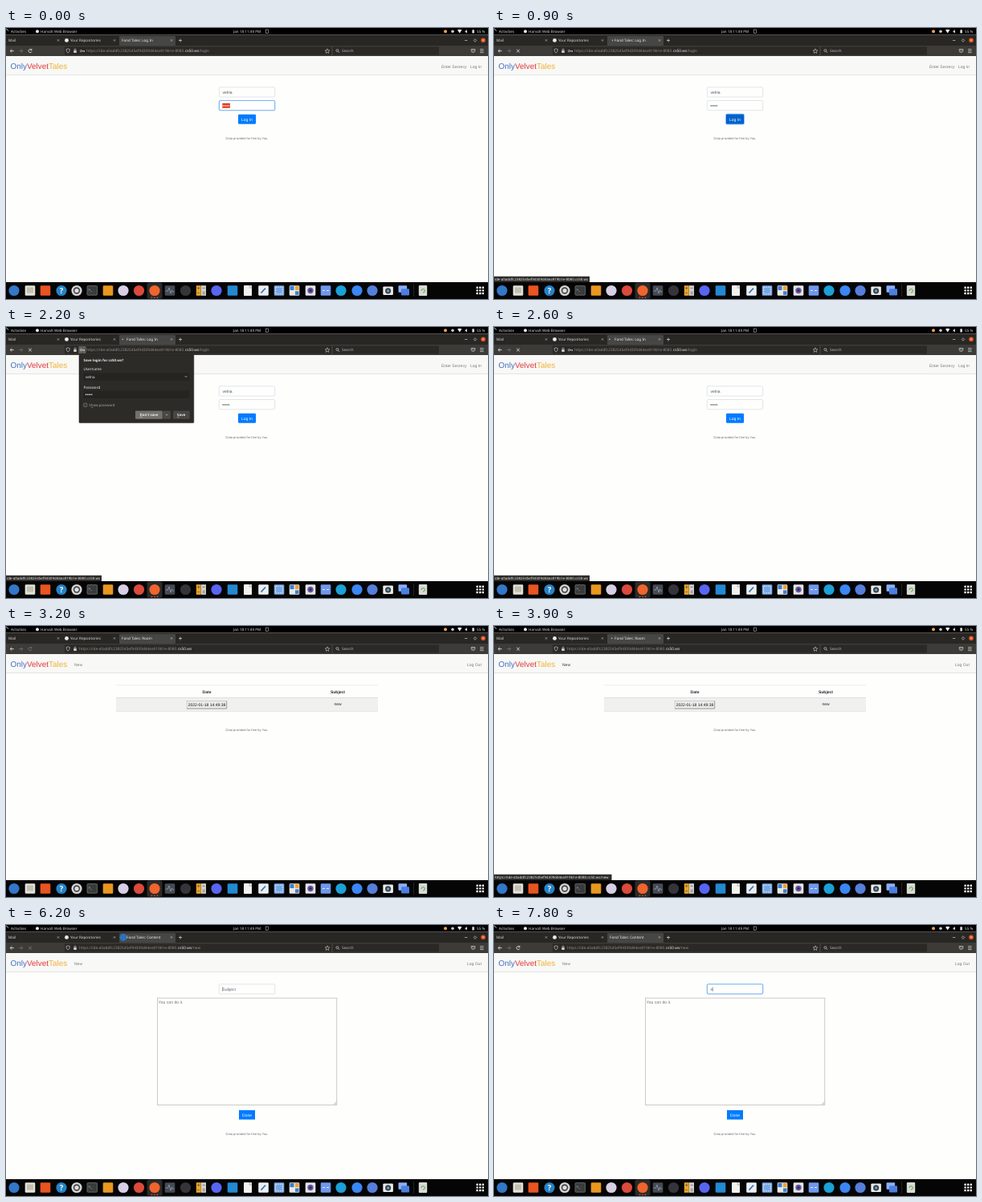
Write an HTML page that moves like this. It is 600 px wide and 338 px high and loops after 8000 ms.

```html
<!DOCTYPE html>
<html lang="en">
<head>
<meta charset="utf-8">
<title>Diary login</title>
<style>
html, body { margin: 0; width: 100%; height: 100%; overflow: hidden; background: #fefefe; }
svg { display: block; width: 100vw; height: 100vh; text-rendering: geometricPrecision; white-space: pre; }
.ui { font-family: "Noto Sans", sans-serif; font-size: 4.6px; }
.page { font-family: "Liberation Sans", Arial, sans-serif; font-size: 5px; }
</style>
</head>
<body>
<svg id="stage" viewBox="0 0 600 338"></svg>
<script>
const LOOP = 8000, LOADED = 2800, CLICK = 3800, EDIT = 6100;
const HOST = 'ide-a0addfc2382545ef94309d44ea919b1e-8080.';
const USER = 'velna';

const rect = (x, y, w, h, fill, more = '') =>
  `<rect x="${x}" y="${y}" width="${w}" height="${h}" fill="${fill}" ${more}/>`;
const dot = (x, y, r, fill, more = '') => `<circle cx="${x}" cy="${y}" r="${r}" fill="${fill}" ${more}/>`;
const line = (d, color = '#ddd', w = .7, more = '') =>
  `<path d="${d}" fill="none" stroke="${color}" stroke-width="${w}" ${more}/>`;
const text = (x, y, s, fill, more = '') => `<text x="${x}" y="${y}" fill="${fill}" ${more}>${s}</text>`;
const mid = 'text-anchor="middle" ', bold = 'font-weight="700" ';
const size = n => `style="font-size:${n}px"`;
// content visible only during "from-to" spans, in ms
const during = (spans, ...parts) => `<g data-spans="${spans}">${parts.join('')}</g>`;
const cross = (x, y, r = 1.2, color, w) =>
  line(`M${x - r} ${y - r}l${2 * r} ${2 * r}m0 ${-2 * r}l${-2 * r} ${2 * r}`, color, w);
const chevron = (x, y) => line(`M${x - 1.3} ${y - .6}l1.3 1.3 1.3-1.3`);
const bullets = (x, y, color) => [0, 1, 2, 3, 4].map(i => dot(x + 1 + i * 1.85, y, .75, color)).join('');

function topBar() {
  return rect(0, 0, 600, 8.5, '#000') + line('M0 .5l3 3.2', '#eee', .9) +
    text(6, 6, 'Activities', '#ddd') +
    dot(39, 4.3, 2, '#e8e8e8') + text(43, 6, 'Harvolt Web Browser', '#ddd') +
    text(283, 6, 'Jan 18  11:49 PM', '#ddd') + rect(323.5, 2, 3, 4.4, 'none', 'stroke="#bbb" stroke-width=".6"') +
    dot(547, 4.2, 2, '#f0a050') + dot(556, 4.2, 1.8, '#ccc') +
    '<path d="M562 2.6q2.7-1.6 5.4 0l-2.7 3.8z" fill="#eee"/>' +
    '<path d="M571.5 3.4h1l1.4-1.3v4.4l-1.4-1.3h-1z" fill="#ddd"/>' +
    rect(580.3, 2.2, 2.6, 4.4, '#ddd', 'rx=".5"') + text(586, 6, '55 %', '#ddd');
}

function tabs() {
  const title = (from, to, x, name) => during(`${from}-${to}`, text(x, 17.2, 'Fond Tales: ' + name, '#f2f2f2'));
  return rect(0, 8.5, 600, 14, '#282724') + rect(141, 10, 70, 12, '#464745', 'rx="1"') +
    text(3, 17.2, 'Mail', '#ddd') + dot(75.5, 15.4, 2.4, '#eee') + text(80, 17.2, 'Your Repositories', '#ddd') +
    [65, 135, 206].map(x => cross(x, 15.4, 1.1, '#ccc', .6)).join('') +
    line('M215 15.5h4m-2-2v4') +
    line('M571 15.5h3.4', '#ccc') + line('M584 13.7l1.8 1.8-1.8 1.8-1.8-1.8z', '#ccc') +
    dot(594, 15.2, 2.8, '#e95420') + cross(594, 15.2, .9, '#fff', .5) +
    title(0, 700, 144, 'Log In') + title(700, LOADED, 150, 'Log In') +
    title(LOADED, 3100, 150, 'Room') + title(3100, CLICK, 144, 'Room') + title(CLICK, EDIT, 150, 'Room') +
    dot(146, 15.4, 4, '#2c74c4', 'id="burst"') +
    title(EDIT, 6600, 150, 'Content') + title(6600, LOOP, 144, 'Content') +
    dot(145, 15.4, .8, '#bbb', 'id="spinner"');
}

function toolbar() {
  const stop = c => cross(30, 28.6, 1.8, c, .8);
  const reload = c => line('M31.9 27.4a2.1 2.1 0 1 0 .2 1.9m-.1-3.4v1.7h-1.8', c, .8);
  const url = (x, path) => text(x, 30.3, 'https://' + HOST, '#92918d', size(4.74)) +
    text(x + 123, 30.3, `cs50.ws<tspan fill="#92918d">${path}</tspan>`, '#f2f2f2', size(4.74));
  return rect(0, 22, 600, 13, '#3c3b37') +
    line('M9.8 28.6h-4.6m2.1-2.1l-2.1 2.1 2.1 2.1', '#eee', .8) +
    line('M16.2 28.6h4.6m-2.1-2.1l2.1 2.1-2.1 2.1', '#777', .8) +
    during('0-700,3500-3800,6900-8000', reload('#eee')) +
    during('2800-3500,6300-6900', reload('#77756f')) +
    during('700-2800,3800-6100', stop('#eee')) + during('6100-6300', stop('#85837e')) +
    rect(73, 23.4, 332, 10.2, '#2a2926', 'rx="1.2"') + rect(407, 23.4, 132, 10.2, '#2a2926', 'rx="1.2"') +
    line('M75 26.6l2.2-.8 2.2.8q0 3.2-2.2 4.6q-2.2-1.4-2.2-4.6z', '#ccc') +
    rect(84.2, 28, 3.6, 3, '#ccc', 'rx=".4"') + line('M85 28v-1a1 1 0 0 1 2 0v1', '#ccc') +
    during('1000-2500', rect(90.3, 24, 9.2, 9, '#62605b', 'rx="1"')) +
    during('0-2800', line('M94.5 28.6h3v1.4m-1.4-1.4v1', '#ddd') +
      dot(93.4, 28.6, 1.1, 'none', 'stroke="#ddd" stroke-width=".7"'), url(100, '/login')) +
    during('2800-6100', url(91, '')) + during('6100-8000', url(91, '/new')) +
    line('M400 25.8l.8 2 2.1.1-1.6 1.4.5 2.1-1.8-1.1-1.8 1.1.5-2.1-1.6-1.4 2.1-.1z', '#ccc', .6) +
    dot(412.4, 28.1, 1.5, 'none', 'stroke="#ccc" stroke-width=".7"') + line('M413.5 29.2l1.6 1.6') +
    text(418, 30.3, 'Search', '#bbb') +
    line('M579.2 26.5h4.6v1.6a2.3 2.3 0 0 1-4.6 0zm1.2 1.1l1.1 1.1 1.1-1.1') +
    line('M590 26.6h4.6m-4.6 2h4.6m-4.6 2h4.6');
}

function header() {
  const nav = (x, s, fill = '#787878') => text(x, 50, s, fill);
  return rect(0, 35, 600, 23.5, '#f8f8f7') + rect(0, 58, 600, .7, '#dcdcdc') +
    text(5.5, 50.6, '<tspan fill="#4070c0">Only</tspan><tspan fill="#df3a3a">Velvet</tspan><tspan fill="#f0b234">Tales</tspan>', '', size(9.95)) +
    during('0-2800', nav(542, 'Enter Secrecy'), nav(578, 'Log In')) +
    during('2800-8000', nav(574, 'Log Out')) +
    during('2800-3600,6100-8000', nav(85, 'New')) + during('3600-6100', nav(85, 'New', '#333'));
}

const input = y => rect(265.3, y, 69.4, 12.2, '#fefefd', 'rx="1.3" stroke="#ced4da" stroke-width=".6"');
const ring = (x, y, w, h, more = '') =>
  rect(x, y, w, h, 'none', `rx="1.5" stroke="#76b5f8" stroke-width="1.1" ${more}`);
const button = (x, y, w, h, fill, s, r) =>
  rect(x, y, w, h, fill, `rx="${r}"`) + text(x + w / 2, y + h / 2 + 1.8, s, '#fff', mid);
const footer = y => text(300, y, 'Data provided for free by You.', '#6c757d', mid + size(4));

function loginPage() {
  return input(73.8) + text(269.5, 81.7, USER, '#495057') + input(90.5) +
    during('0-700', ring(265.3, 90.5, 69.4, 12.2), rect(269.3, 93.8, 9.6, 6, '#e23c20'), bullets(269, 97, '#fff')) +
    during('700-2800', bullets(269, 97, '#495057')) +
    during('0-700,1700-2800', button(289, 107.7, 22, 12, '#007bff', 'Log In', 1.3)) +
    during('700-1700', ring(288.7, 107.4, 22.6, 12.6), button(289, 107.7, 22, 12, '#0062cc', 'Log In', 1.3)) +
    footer(139);
}

function roomPage() {
  return rect(137, 73.6, 326, .6, '#dee2e6') + rect(137, 90, 326, 16.4, '#f0f0ef') +
    rect(137, 89, 326, 1, '#dcdfe2') + rect(137, 106, 326, .6, '#dcdcdc') +
    text(250, 83.6, 'Date', '#212529', mid + bold) + text(413, 83.6, 'Subject', '#212529', mid + bold) +
    rect(225.2, 93.6, 49.4, 9.4, '#ececec', 'stroke="#bbb" stroke-width=".6"') + line('M225 103h49.7v-9.5', '#888') +
    text(250, 100.2, '2022-01-18 14:49:38', '#111', mid) + text(413, 99.2, 'new', '#212529', mid) + footer(131);
}

function editPage() {
  const caret = x => rect(x, 77.2, .4, 5.6, '#444');
  return input(73.8) + ring(265.3, 73.8, 69.4, 12.2, 'id="focus"') +
    during('6100-7800', text(269.3, 81.7, 'Subject', '#5c646b')) +
    during('6100-6800,7400-7800', caret(269)) +
    during('7800-8000', text(269.5, 81.7, 'n', '#495057') + caret(272.6)) +
    rect(188.4, 91.1, 223.4, 133.3, '#fefefd', 'stroke="#b4b4b4" stroke-width=".7"') +
    line('M408 223.8l3.2-3.2m-1.5 3.2l1.5-1.5', '#777', .5) +
    text(189.8, 98, 'You can do it.', '#707070', size(5.1)) +
    button(290, 231, 20, 11.6, '#007bff', 'Done', 0) + footer(262.4);
}

function saveDialog() {
  const label = (x, y, s, more) => text(x, y, s, '#eee', more);
  const choice = fill => rect(161, 104.4, 33.8, 10.4, fill, 'rx="1"');
  const field = y => rect(96.3, y, 132, 9.6, '#252421', 'rx="1"');
  return rect(91, 34.6, 142.8, 85, '#2c2b28', 'rx="1.2" stroke="#1b1a18" stroke-width=".5"') +
    '<path d="M92.5 34.8l2.6-2.6 2.6 2.6z" fill="#2c2b28"/>' +
    label(96.5, 43, 'Save login for cs50.ws?', bold + size(4.4)) +
    label(96.5, 54, 'Username') + field(57.2) + label(99, 63.5, USER) + chevron(224, 61.8) +
    label(96.5, 76.6, 'Password') + field(79.3) + bullets(98.4, 84.2, '#eee') +
    rect(96.7, 95.2, 4.2, 4.2, '#3b3a37', 'rx=".6" stroke="#999" stroke-width=".5"') +
    text(103.3, 99, 'S<tspan text-decoration="underline">h</tspan>ow password', '#aaa', size(4.4)) +
    during('1000-1800', choice('#484744')) + during('1800-2500', choice('#73716d')) +
    rect(195.2, 104.4, 9.8, 10.4, '#484744', 'rx="1"') + chevron(200, 109.5) +
    rect(208, 104.4, 20.6, 10.4, '#484744', 'rx="1"') +
    label(178, 111.2, '<tspan text-decoration="underline">D</tspan>on\'t save', mid + bold + size(4.4)) +
    label(218.2, 111.2, '<tspan text-decoration="underline">S</tspan>ave', mid + bold + size(4.4));
}

const status = (s, w) => rect(0, 309.8, w, 7.2, '#2c2b28') + text(1, 315.2, s, '#eee', size(4.45));

function dock() {
  const y = 327.5;
  const disc = (x, fill) => dot(x, y, 6.6, fill);
  const tile = (x, fill) => rect(x - 6.3, y - 6.3, 12.6, 12.6, fill, 'rx="1.3"');
  const sheet = x => rect(x - 5, y - 6.5, 10, 13, '#f1f1ef', 'rx=".8"');
  return rect(0, 317, 600, 21, '#050505') + rect(175.5, 317.5, 19, 20, '#2a2a2a', 'rx="2"') +
    disc(10, '#3277c8') +
    tile(30, '#e4e1d8') + rect(26, 323.5, 8, 7, '#c3bfb3') +
    tile(49, '#e95420') +
    disc(69, '#2583c7') + text(69, 331, '?', '#fff', mid + bold + size(9.5)) +
    disc(88, '#d5d5d5') + dot(88, y, 4.2, '#444') + dot(88, y, 2.6, '#ddd') +
    rect(101, 321.6, 12.6, 11.6, '#393c3d', 'rx="1" stroke="#888" stroke-width=".6"') + text(102.5, 328, '&gt;_', '#eee', size(4.5)) +
    tile(127, '#e8981f') + disc(146, '#d6cfe6') + disc(165.5, '#db4a3c') + disc(185, '#f0642d') +
    tile(204, '#454a55') + line('M198.5 328h3l1.5-4 2 7 1.5-4 1 2h2', '#aab9c6', .6) +
    disc(223.5, '#35343a') +
    rect(236.8, 321.2, 6, 12.6, '#eba52b') + rect(243, 321.2, 6, 12.6, '#d0d0cc') +
    line('M238 324.4h3.5m-1.8-1.7v3.5m5-1.8h3m-3 5h3m-3 2h3m-9.7-1h3', '#555') +
    disc(262, '#5865f2') + tile(282, '#2389d0') +
    sheet(301) + line('M303 321.2l3 3h-3z', '#aaa') +
    tile(320.5, '#eceff1') + line('M317.5 330.5l5.5-6', '#3672b9', 1.8) +
    tile(340, '#78a7e4') + rect(335.7, 323.2, 8.6, 8.6, 'none', 'stroke="#fff" stroke-width=".8" stroke-dasharray="1.6 1.1"') +
    tile(359, '#e8e8e6') + rect(353.5, 322, 5, 5, '#3d7fd1') + rect(360, 322, 4.5, 5, '#f0a130') + rect(360, 328.3, 4.5, 4.5, '#3d7fd1') +
    tile(379, '#e4e4e6') + dot(379, y, 3.7, '#6a56a5') + dot(379, y, 1.8, '#383052') +
    tile(398, '#6f98ec') + line('M394 327.5h3m2 0h3', '#dfe8fb', 1) +
    disc(417, '#1ba0d7') + disc(437, '#3a86f4') + disc(456, '#557fda') +
    rect(469.3, 322.4, 12.6, 10.6, '#e9e9e9', 'rx="1.2"') + dot(475.6, 327.8, 3.6, '#39444d') + dot(475.6, 327.8, 1.6, '#6fa3c4') +
    rect(488.5, 321.3, 10.6, 8.5, '#8ab0f5', 'rx="1"') + rect(492, 325.2, 10, 8.3, '#4c7fe0', 'rx="1"') +
    rect(507.2, 320, .5, 15, '#444') +
    rect(513.8, 321, 10.4, 13, '#d7dcd3', 'rx="1"') + line('M517 328a2.2 2.2 0 1 1 2 2', '#5f9a55', 1) +
    [181.5, 185, 188.5].map(x => dot(x, 336.4, .8, '#e95420')).join('') +
    [0, 1, 2].map(r => [0, 1, 2].map(c => rect(585.4 + c * 3.6, 322.6 + r * 3.6, 2.4, 2.4, '#eee', 'rx=".5"')).join('')).join('');
}

const stage = document.getElementById('stage');
stage.innerHTML =
  rect(0, 0, 600, 338, '#fefefd') +
  `<g class="page">${header()}` +
  during('0-2800', loginPage()) + during('2800-6100', roomPage()) + during('6100-8000', editPage()) + '</g>' +
  `<g class="ui">${topBar()}${tabs()}${toolbar()}` +
  during('1000-2500', saveDialog()) +
  during('900-2800', status(HOST + 'cs50.ws', 119)) +
  during('3600-6100', status('https://' + HOST + 'cs50.ws/new', 146.5)) +
  dock() + '</g>';

const timed = [...stage.querySelectorAll('[data-spans]')].map(el => ({
  el, spans: el.dataset.spans.split(',').map(s => s.split('-').map(Number))
}));
const [spinner, burst, focusRing] = ['spinner', 'burst', 'focus'].map(id => document.getElementById(id));
const clamp = v => Math.max(0, Math.min(1, v));

function draw(now) {
  const t = Math.floor(now % LOOP / 100) * 100;
  for (const { el, spans } of timed)
    el.style.display = spans.some(([a, b]) => t >= a && t < b) ? '' : 'none';

  const start = t < LOADED ? 700 : CLICK, end = t < LOADED ? LOADED : EDIT;
  spinner.style.opacity = t >= start && t < end ? 1 : 0;
  spinner.setAttribute('cx', 145.3 + 2.4 * Math.sin((t - start) / 500 * Math.PI));

  const age = t - (t < EDIT ? LOADED : EDIT);
  burst.style.opacity = age < 0 ? 0 : clamp(1.25 - age / 320);
  burst.setAttribute('r', 4 + 2 * clamp(age / 400));
  focusRing.style.opacity = clamp((t - 6200) / 150);
  requestAnimationFrame(() => draw(performance.now()));
}
draw(performance.now());
</script>
</body>
</html>
```
